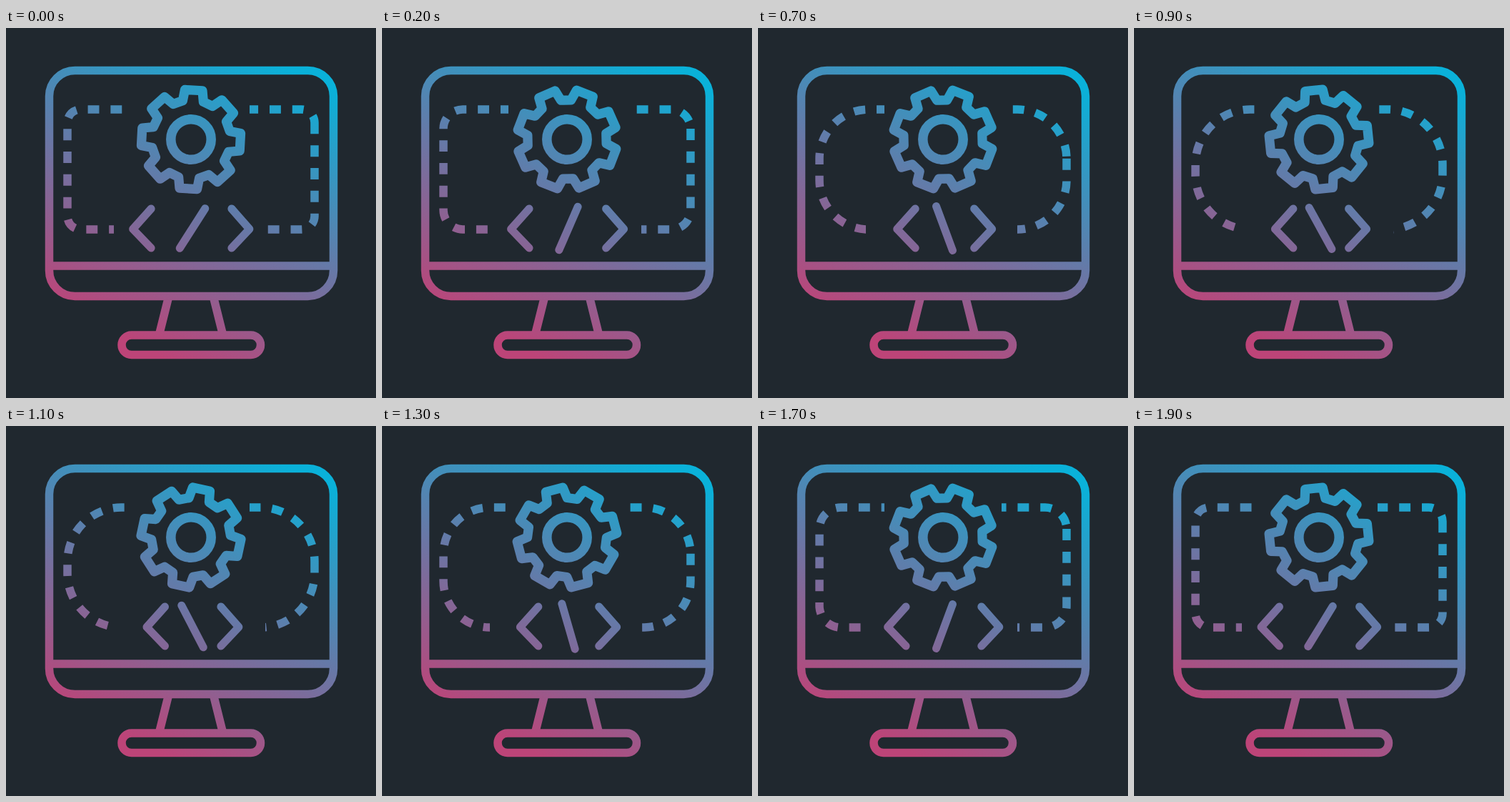
Recreate the animation shown at these times as an HTML page. Size 518 by 518 pixels, loop 2000 ms.

```html
<!DOCTYPE html>
<html lang="en">
<head>
<meta charset="utf-8">
<title>Coding monitor</title>
<style>
  html, body { margin: 0; width: 100%; height: 100%; overflow: hidden; background: #20282f; }
  svg { display: block; width: 100vw; height: 100vh; }
</style>
</head>
<body>
<svg viewBox="0 0 518 518">
  <defs>
    <linearGradient id="tint" gradientUnits="userSpaceOnUse" x1="172" y1="438" x2="363" y2="42">
      <stop offset="0" stop-color="#bd4478"/>
      <stop offset="1" stop-color="#0ab1d9"/>
    </linearGradient>
    <clipPath id="frameGaps">
      <path d="M0 0H177V198H151V400H0ZM518 0H341V198H363V400H518Z"/>
    </clipPath>
    <!-- All line art is a mask, so the gradient stays fixed while parts move. -->
    <mask id="art" maskUnits="userSpaceOnUse" x="0" y="0" width="518" height="518">
      <g fill="none" stroke="#fff" stroke-width="11.5" stroke-linejoin="round">
        <rect x="60.5" y="59.5" width="398" height="316" rx="36"/>
        <path d="M60 333H458M227 379L215 427M291 379L303 427"/>
        <rect x="162" y="430" width="194.5" height="27.5" rx="13.7"/>
        <circle cx="259" cy="156" r="28.2" stroke-width="13.5"/>
        <path id="gear" stroke-width="13.2"/>
        <g clip-path="url(#frameGaps)">
          <path id="dashes" stroke-dasharray="15.9"/>
        </g>
        <g stroke-width="11" stroke-linecap="round">
          <path id="bracketLeft" d="M203 253L177.5 281.5L203 308"/>
          <path id="slash" d="M0 -33V33"/>
          <path id="bracketRight" d="M316 253L341 281.5L316 308"/>
        </g>
      </g>
    </mask>
  </defs>
  <rect width="518" height="518" fill="url(#tint)" mask="url(#art)"/>
</svg>
<script>
const LOOP = 2000, TEETH = 8;
const part = id => document.getElementById(id);
const place = (id, transform) => part(id).setAttribute('transform', transform);

function gearOutline() {
  const tooth = [[-14.5, -53.5], [-12.3, -69], [12.3, -69], [14.5, -53.5]];
  const points = [];
  for (let i = 0; i < TEETH; i++) {
    const a = i * 2 * Math.PI / TEETH, c = Math.cos(a), s = Math.sin(a);
    for (const [x, y] of tooth) points.push(`${(x * c - y * s).toFixed(2)} ${(x * s + y * c).toFixed(2)}`);
  }
  return `M${points.join('L')}Z`;
}

// Clockwise from below the top right corner: the dashes slide as the radius changes the length.
function roundedFrame(r) {
  const left = 86, right = 432, top = 114, bottom = 282;
  const arc = `A${r} ${r} 0 0 1 `;
  return `M${right} ${top + r}V${bottom - r}${arc}${right - r} ${bottom}` +
    `H${left + r}${arc}${left} ${bottom - r}V${top + r}${arc}${left + r} ${top}` +
    `H${right - r}${arc}${right} ${top + r}`;
}

function draw(t) {
  // The outward swing runs slightly ahead and rests briefly at its far end.
  const clock = t < 1000 ? Math.min(t + 55, 1000) : t;
  const p = (1 - Math.cos(2 * Math.PI * clock / LOOP)) / 2;

  place('gear', `translate(259 156) rotate(${3 + 180 * t / LOOP})`);
  place('slash', `translate(261 280.5) rotate(${33 - 62 * p})`);
  place('bracketLeft', `translate(${20 * p} 0)`);
  place('bracketRight', `translate(${-15.5 * p} 0)`);
  part('dashes').setAttribute('d', roundedFrame(18 + 59 * p));
}

part('gear').setAttribute('d', gearOutline());
const start = performance.now();
function tick() {
  draw((performance.now() - start) % LOOP);
  requestAnimationFrame(tick);
}
tick();
</script>
</body>
</html>
```
